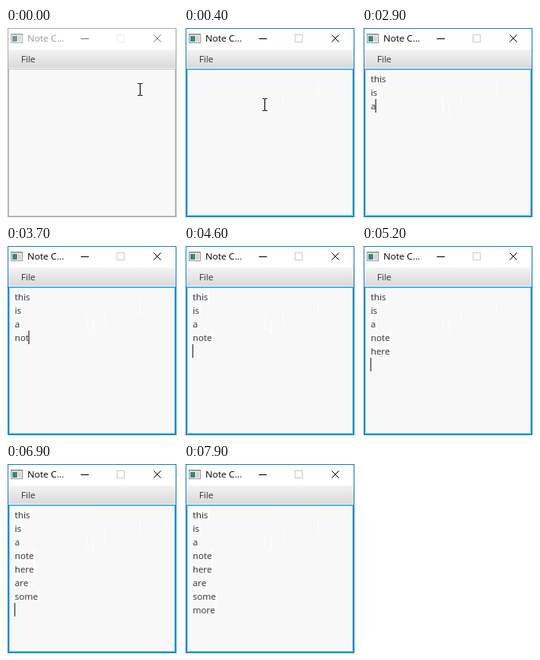
An HTML page that plays this animation: 216 px wide and 238 px high, repeating every 8 s.

```html
<!DOCTYPE html>
<html lang="en">
<head>
<meta charset="utf-8">
<style>
  html, body { margin: 0; width: 100%; height: 100%; overflow: hidden; background: #fff; }
  svg { display: block; }
  text { font: 11.3px "Open Sans", "Noto Sans", sans-serif; fill: #333; white-space: pre; }
  #title { font-size: 11.6px; fill: #000; }
  .line { fill: none; stroke: #000; }
  #max { stroke: #ccc; }
  #frame { stroke: #1883d7; }
  #ring { stroke: #1c97d4; }
  .idle #title { fill: #999; }
  .idle .line { stroke: #777; }
  .idle #max { stroke: #eee; }
  .idle #frame { stroke: #aaa; }
  .idle #ring { stroke: #c4c4c4; }
  .idle #glow { display: none; }
  .idle #icon { opacity: .8; }
</style>
</head>
<body>
<svg id="stage" width="216" height="238" viewBox="0 0 216 238">
  <defs>
    <linearGradient id="bar" x2="0" y2="1">
      <stop stop-color="#f3f3f3"/><stop offset="1" stop-color="#d9d9d9"/>
    </linearGradient>
    <path id="beam" fill="none" d="M-3-7.5h2.5l.5 .5 .5-.5h2.5M0-7V7M-3 7.5h2.5l.5-.5 .5 .5h2.5"/>
  </defs>
  <rect x="214" y="2" width="1" height="236" fill="#eee"/>
  <rect x="3" y="27" width="210" height="23" fill="url(#bar)"/>
  <rect x="3" y="50" width="210" height="187" fill="#f8f8f8"/>
  <g id="icon">
    <rect x="6.5" y="7.5" width="14" height="11" fill="#f4f4f4" stroke="#999"/>
    <path d="M7 8.5h13" stroke="#aaa"/>
    <rect x="8" y="10" width="6" height="7" fill="#3c8580"/>
    <rect x="15" y="10" width="4" height="7" fill="#d4d4d4"/>
  </g>
  <text id="title" x="27" y="17">Note C...</text>
  <text x="19" y="43">File</text>
  <path class="line" d="M94 13.5h10M185.500 8.500l9 9M194.500 8.500l-9 9"/>
  <rect class="line" id="max" x="139.500" y="8.500" width="9" height="9"/>
  <rect id="glow" x="4.500" y="52.500" width="207" height="182" fill="none" stroke="#a8d8ee"/>
  <rect id="ring" x="3.500" y="51.500" width="209" height="184" fill="none"/>
  <rect id="frame" x="2.500" y=".5" width="211" height="236" fill="none"/>
  <g id="trail" stroke="#fff"></g>
  <g id="ends" fill="#fff"></g>
  <g id="note"></g>
  <rect id="caret" width="1.200" height="17" fill="#333"/>
  <use id="pointer" href="#beam" stroke="#000"/>
</svg>
<script>
const LOOP = 8000, LEFT = 11, TOP = 55, STEP = 17, BLINK = 500;
const FOCUS = 400, CLICK = 500, HIDE = 700;
const $ = id => document.getElementById(id);

// [start, x, y] of the mouse pointer
const moves = [[0, 168.5, 77], [100, 124.5, 90], [200, 101.5, 96], [500, 109.5, 101]];

// [time, typed characters]
const keys = [
  [1400, "t"], [1500, "h"], [1600, "i"], [1700, "s"], [2000, "\n"],
  [2400, "i"], [2500, "s"], [2700, "\n"], [2900, "a"], [3200, "\n"],
  [3600, "no"], [3700, "t"], [4100, "e"], [4600, "\n"],
  [4900, "he"], [5000, "re"], [5200, "\n"], [5600, "ar"], [5700, "e"], [6400, "\n"],
  [6600, "so"], [6700, "m"], [6800, "e"], [6900, "\n"],
  [7200, "m"], [7300, "or"], [7400, "e"]
];

function add(parent, tag, attrs) {
  const el = document.createElementNS("http://www.w3.org/2000/svg", tag);
  for (const k in attrs) el.setAttribute(k, attrs[k]);
  return parent.appendChild(el);
}

const trail = moves.map(([, x, y]) => add($("trail"), "use", { href: "#beam", x, y }));
const rows = Array.from({ length: 8 }, (_, i) => ({
  text: add($("note"), "text", { x: LEFT, y: TOP + 13 + i * STEP }),
  end: add($("ends"), "rect", { y: TOP + i * STEP, width: 2, height: STEP })
}));

const show = (el, on) => el.setAttribute("visibility", on ? "visible" : "hidden");

function draw(t) {
  $("stage").classList.toggle("idle", t < FOCUS);

  const pos = moves.filter(m => m[0] <= t).length - 1;
  $("pointer").setAttribute("x", moves[pos][1]);
  $("pointer").setAttribute("y", moves[pos][2]);
  show($("pointer"), t < HIDE);
  trail.forEach((el, i) => show(el, i < pos || t >= HIDE));

  const typed = keys.filter(k => k[0] <= t);
  const lines = typed.map(k => k[1]).join("").split("\n");
  const last = typed.length ? typed[typed.length - 1][0] : CLICK;
  const lit = t >= CLICK && (t - last) % (2 * BLINK) < BLINK;
  const row = lines.length - 1;

  rows.forEach(({ text, end }, i) => {
    const s = lines[i] || "";
    if (text.textContent !== s) text.textContent = s;
    const x = LEFT - 0.6 + (s ? text.getComputedTextLength() : 0);
    end.setAttribute("x", x);
    show(end, s && (i < row || !lit));
    if (i === row) $("caret").setAttribute("x", x);
  });
  $("caret").setAttribute("y", TOP + row * STEP);
  show($("caret"), lit);
}

function tick() {
  draw(performance.now() % LOOP);
  requestAnimationFrame(tick);
}
tick();
</script>
</body>
</html>
```
